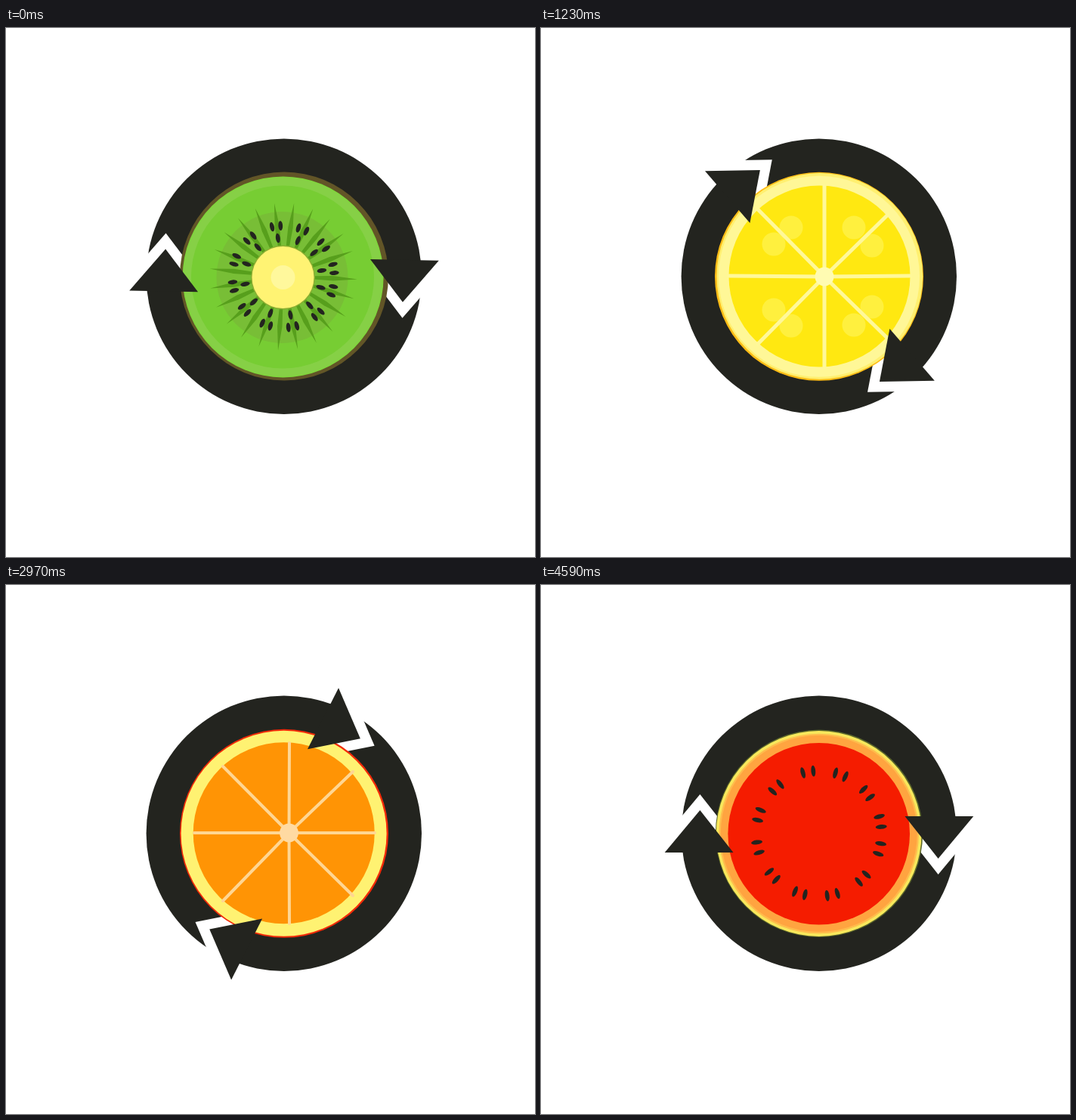
An HTML page with a canvas that plays this animation: 700x700 px, repeating every 4.62 s.

```html
<!DOCTYPE html>
<html>
<head>
<meta charset="utf-8">
<style>
  html, body { margin: 0; width: 100%; height: 100%; overflow: hidden; background: #fff; }
  canvas { display: block; }
</style>
</head>
<body>
<canvas id="stage" width="700" height="700"></canvas>
<script>
const ctx = document.getElementById('stage').getContext('2d');
const LOOP = 4620, STEP = 30, CX = 368, CY = 328.8, BLACK = '#23241f';
const rad = deg => deg * Math.PI / 180;

function disc(x, y, r, color) {
  ctx.fillStyle = color;
  ctx.beginPath();
  ctx.arc(x, y, r, 0, 2 * Math.PI);
  ctx.fill();
}

function polygon(points, color) {
  ctx.fillStyle = color;
  ctx.beginPath();
  points.forEach(([x, y]) => ctx.lineTo(x, y));
  ctx.closePath();
  ctx.fill();
}

// Runs draw with the origin at (x, y), turned clockwise by deg
function turned(x, y, deg, draw) {
  ctx.save();
  ctx.translate(x, y);
  ctx.rotate(rad(deg));
  draw();
  ctx.restore();
}

function seed(x, y, deg, r, w, h) {
  turned(x, y, deg, () => {
    ctx.fillStyle = BLACK;
    ctx.beginPath();
    ctx.ellipse(0, -r, w, h, 0, 0, 2 * Math.PI);
    ctx.fill();
  });
}

// Directions of the seed groups, clockwise from the top
const seedGroups = [-8, 22, 52, 81, 106, 137.5, 169.5, 199.5, 229.5, 259, 289, 319];

function kiwi() {
  disc(CX, CY - .3, 138, '#625527');
  disc(366.6, 329.4, 133, '#7fd63c');
  disc(366.6, 329.4, 131.5, '#86d046');
  disc(366, 329.5, 121, '#77cd33');
  disc(365.5, 330, 87, '#78be36');
  for (let i = 0; i < 23; i++) {
    turned(367, 329, 92 + i * 15.35, () =>
      polygon([[-2, -38], [-3.2, -66], [0, -98], [3.2, -66], [2, -38]], '#579f1c'));
  }
  disc(366.5, 330, 42.5, '#8aae32');
  disc(366.5, 330, 41, '#fff373');
  disc(366.5, 330, 16, '#fff89c');
  for (const deg of seedGroups) {
    seed(367, 329, deg - 4.8, 67.5, 2.9, 6.3);
    seed(367, 329, deg + 4.8, 67.5, 2.9, 6.3);
    seed(367, 329, deg, 51.5, 2.9, 6.3);
  }
}

function spokes(hubX, hubY, color, hubColor, width) {
  ctx.strokeStyle = color;
  ctx.lineWidth = width;
  ctx.lineCap = 'round';
  ctx.beginPath();
  for (const [x, y] of [[375, 209], [459, 247], [488, 328], [459, 411],
                        [375, 448], [287, 418], [249, 328], [287, 240]]) {
    ctx.moveTo(hubX, hubY);
    ctx.lineTo(x, y);
  }
  ctx.stroke();
  disc(hubX, hubY, 12.5, hubColor);
}

function lemon() {
  disc(CX, CY, 138, '#ffbd16');
  disc(368.8, CY - .4, 136.3, '#fff070');
  disc(CX, CY, 133, '#fff797');
  disc(368.5, 328.5, 120, '#ffe811');
  for (const [x, y] of [[331, 264], [308, 286], [414, 264], [438, 288],
                        [308, 373], [331, 394], [414, 393], [438, 369]]) {
    disc(x, y, 15.5, '#fff03e');
  }
  spokes(375, 329, '#fff89a', '#fffbb2', 5);
}

function orange() {
  disc(CX, CY, 138, '#f32a08');
  disc(367.6, CY, 136, '#fff272');
  disc(367.7, 328.3, 120, '#ff9405');
  spokes(374.5, 328, '#ffd693', '#ffdaa2', 4);
}

function melon() {
  disc(CX, CY, 137.2, '#5b672b');
  disc(367.7, 329, 135.9, '#f8e85c');
  disc(367.7, 329, 132.3, '#ffbc4c');
  disc(367.7, 329, 130, '#ffa440');
  disc(367.7, 329.2, 120.3, '#f51c00');
  for (const deg of seedGroups) {
    seed(367.7, 328.8, deg - 6.7, 83, 2.9, 7.5);
    seed(367.7, 328.8, deg + 2.9, 83, 2.9, 7.5);
  }
}

const fruits = [[3360, melon], [2400, orange], [1200, lemon], [0, kiwi]];

// Two opposite triangles, turning about a point slightly off their middle;
// shift moves them ahead along the ring
function heads(angle, shift, color) {
  turned(CX, CY, angle, () => {
    for (const turn of [0, 180]) {
      turned(0, -1.2, turn, () =>
        polygon([[-157.6, -32 - shift], [-204.3, 24 - shift], [-113.5, 24 - shift]], color));
    }
  });
}

function render(t) {
  const angle = (t + STEP) * 180 / LOOP;
  ctx.fillStyle = '#fff';
  ctx.fillRect(0, 0, 700, 700);
  disc(CX - .2, CY - .1, 182.2, BLACK);
  heads(angle, 21, '#fff');
  fruits.find(([start]) => t >= start)[1]();
  heads(angle, 0, BLACK);
}

const began = performance.now();
function tick() {
  const t = (performance.now() - began) % LOOP;
  render(Math.floor(t / STEP) * STEP);
  requestAnimationFrame(tick);
}
tick();
</script>
</body>
</html>
```
